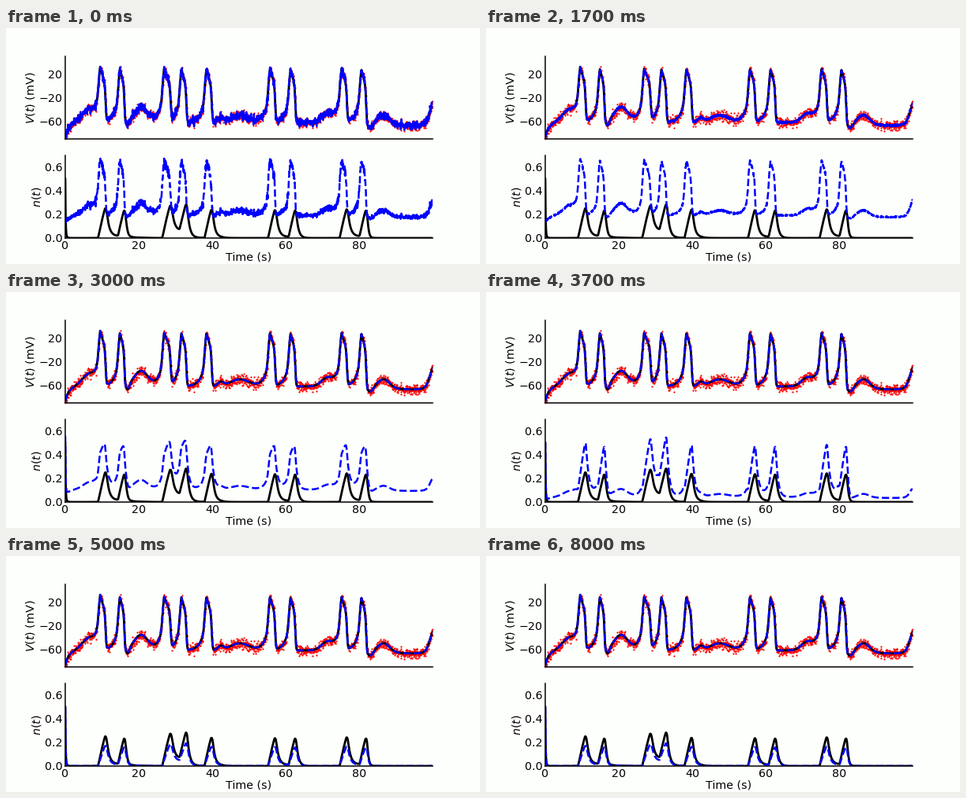
A matplotlib script for the animation above (8300 ms loop, 600 px wide and 300 px high).

```python
import numpy as np
import matplotlib.pyplot as plt
from matplotlib.animation import FuncAnimation

FRAMES, INTERVAL = 83, 100
STEPS_PER_FRAME = 0.3
N = 2000

# Spikes: time, relative width
SPIKES = [(9.5, 1.0), (14.85, 0.85), (26.9, 1.2), (31.6, 0.92), (38.4, 1.0),
          (55.7, 0.97), (61.3, 0.9), (75.2, 1.0), (80.6, 0.9)]
# Slow humps at rest: time, height (mV), width
HUMPS = [(6.3, 18, 1.8), (17.1, -9, 0.5), (20.6, 26, 1.9), (42.3, 7, 0.8),
         (47.5, 12, 2.5), (71.3, 13.5, 1.6), (83, -9, 0.8), (86.7, 14, 1.5),
         (94, -5, 5), (100.4, 36, 1.1)]


def sigmoid(x):
    return 1 / (1 + np.exp(-np.clip(x, -50, 50)))


def smoothstep(x):
    x = np.clip(x, 0, 1)
    return x * x * (3 - 2 * x)


def spike(u, width):
    """Slow foot, fast rise, sloping top and fast fall around u = 0."""
    rise = 55 * np.exp(np.minimum(u, 0) / 1.2) + 35 * sigmoid((u + 0.5) / 0.15)
    w = u / width
    fall = (90 - 20 * w) * sigmoid((1.5 - w) / 0.12)
    return np.where(u < 0, rise, fall)


def voltage(t):
    v = -62 - 25 * np.exp(-t)
    for center, height, width in HUMPS:
        v += height * np.exp(-((t - center) / width) ** 2 / 2)
    for peak, width in SPIKES:
        v += spike(t - peak, width)
    return v


def gate(v, dt, start, drive):
    """Gating variable that opens in spikes and closes at rest."""
    opening = drive * sigmoid((v + 8) / 4)
    closing = np.exp(-(v + 55) / 15)
    n = np.full_like(v, start)
    for i in range(len(v) - 1):
        n[i + 1] = n[i] + dt * (opening[i] * (1 - n[i]) - closing[i] * n[i])
    return n


def instant_gate(v):
    return 0.08 + 0.78 * sigmoid((v + 5) / 32)


time = np.linspace(0, 100, N)
DT = time[1] - time[0]
v_true = voltage(time)
noise = np.random.default_rng(4).normal(0, 4.2, N)
pulses = gate(v_true, DT, 0, 0.155)
decay = gate(v_true, DT, 0.5, 0)
n_middle = 1.55 * pulses + 0.6 * (np.minimum(instant_gate(v_true), 0.3) - 0.12)


def estimate(step):
    """Fitted voltage and gate after the given annealing step."""
    v = v_true + 0.85 * sigmoid((4 - step) / 1.1) * noise
    to_middle = smoothstep((step - 6.5) / 4.5)
    to_final = smoothstep((step - 11) / 4)
    n = (1 - to_middle) * instant_gate(v) + to_middle * n_middle
    n = (1 - to_final) * n + to_final * 0.68 * pulses
    return v, n + smoothstep((step - 5) / 2) * decay


BACKGROUND = "#fdfffc"
plt.rcParams.update({"font.family": "DejaVu Sans", "font.size": 10.3,
                     "figure.facecolor": BACKGROUND,
                     "axes.facecolor": BACKGROUND})
fig, (ax_v, ax_n) = plt.subplots(2, 1, figsize=(6, 3), dpi=100)

for ax in (ax_v, ax_n):
    ax.spines[["top", "right"]].set_visible(False)
    ax.spines[["left", "bottom"]].set_linewidth(1.1)
    ax.set_xlim(0, 100)
    ax.tick_params(axis="x", length=0, pad=2)
    ax.tick_params(axis="y", length=0, pad=2.5)

ax_v.set_ylim(-90, 50)
ax_v.set_xticks([])
ax_v.set_yticks([20, -20, -60])
ax_v.set_ylabel("$V(t)$ (mV)", labelpad=1.4)
ax_n.set_ylim(0, 0.7)
ax_n.set_xticks(range(0, 100, 20))
ax_n.set_yticks([0, 0.2, 0.4, 0.6])
ax_n.set_ylabel("$n(t)$", labelpad=1.4)
ax_n.set_xlabel("Time (s)", labelpad=0.8)

ax_v.plot(time, v_true + noise, "r.", ms=3.2, mew=0)
ax_v.plot(time, v_true, "k", lw=2)
ax_n.plot(time, pulses + decay, "k", lw=2)
v_line, = ax_v.plot([], [], "b--", lw=1.8)
n_line, = ax_n.plot([], [], "b--", lw=1.8)


def draw(frame):
    v, n = estimate(int((frame + 0.5) * STEPS_PER_FRAME))
    v_line.set_data(time, v)
    n_line.set_data(time, n)
    return v_line, n_line


anim = FuncAnimation(fig, draw, frames=FRAMES, interval=INTERVAL,
                     init_func=lambda: draw(0), repeat=True)
plt.show()
```
